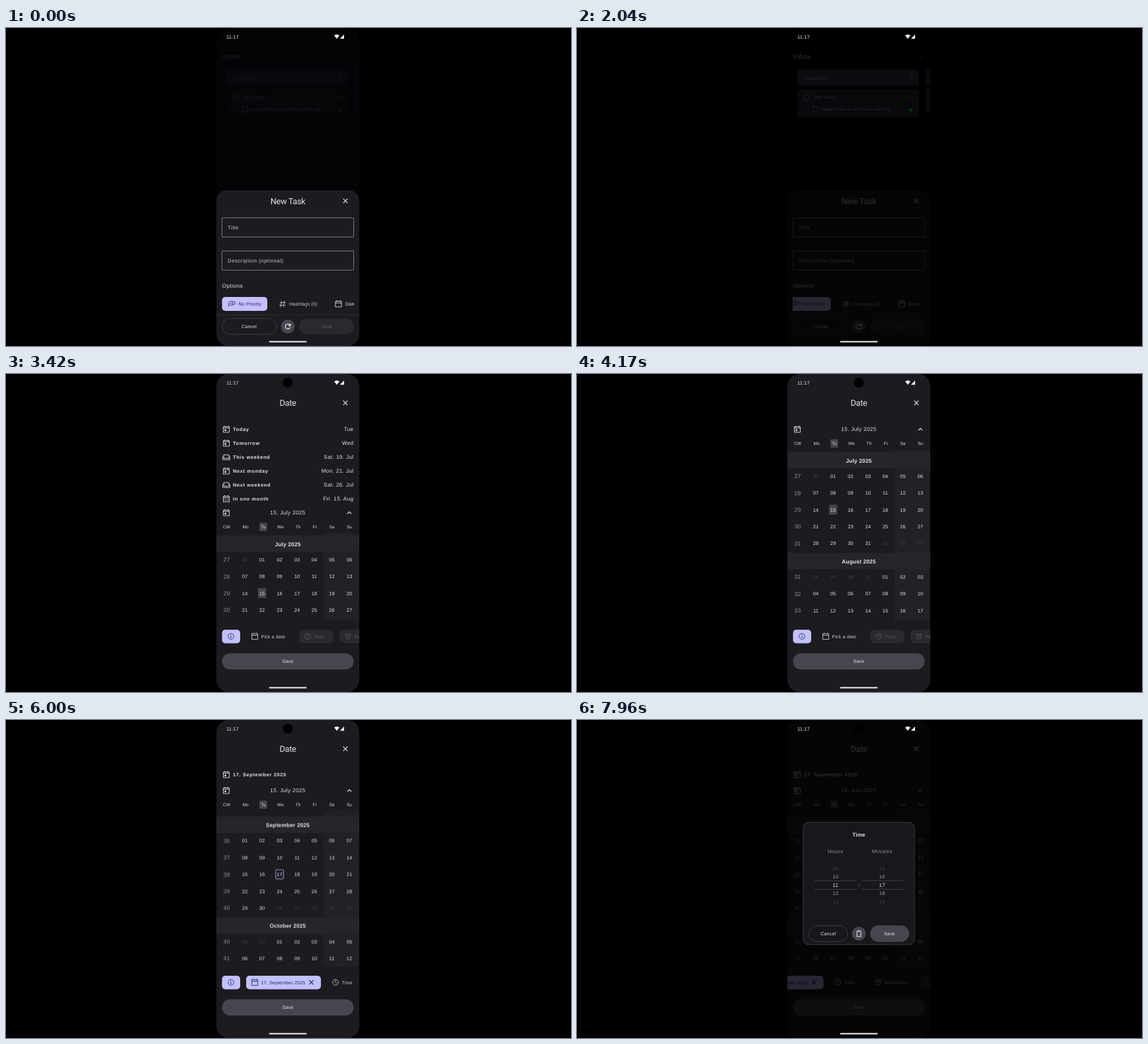
An HTML page for the animation above (8000 ms loop, 854 by 480 pixels).

```html
<!DOCTYPE html>
<html lang="en">
<head>
<meta charset="utf-8">
<title>New task</title>
<style>
  html, body { margin: 0; width: 100%; height: 100%; overflow: hidden; background: #000; }
  svg { display: block; width: 100%; height: 100%; }
  text { font-family: "Liberation Sans", Arial, sans-serif; white-space: pre; }
  .title { font-family: Roboto, sans-serif; }
  use { fill: none; stroke: currentColor; stroke-width: .9; }
  .anim, .drag { animation: 8s linear infinite; }

  #taskChips { animation-name: taskChips; animation-timing-function: ease-in-out; }
  #taskDim { animation-name: taskDim; }
  #inbox { animation-name: inbox; }
  #dateSheet { animation-name: dateSheet; animation-timing-function: ease-out; }
  #outer { animation-name: outer; animation-timing-function: ease-in-out; }
  #months { animation-name: months; animation-timing-function: ease-in-out; }
  .before { animation-name: before; }
  .after { animation-name: after; }
  .drag { animation-name: drag; }
  #touch { animation-name: touch; }
  #timeDim { animation-name: timeDim; }
  #dialog { animation-name: dialog; }

  @keyframes taskChips { 0%, 12.5% { transform: none } 17.5%, 100% { transform: translateX(-11.5px) } }
  @keyframes taskDim { 0%, 23.4% { opacity: 0 } 25.4%, 100% { opacity: .8 } }
  @keyframes inbox { 0%, 23.4% { opacity: .7 } 25.4%, 100% { opacity: 1 } }
  @keyframes dateSheet { 0%, 25.7% { transform: translateY(480px) } 30%, 100% { transform: none } }
  @keyframes outer {
    0%, 43.2% { transform: none }
    51.8%, 53% { transform: translateY(-126px) }
    56%, 71.87% { transform: translateY(-130.5px) }
    71.88%, 100% { transform: translateY(-103px) }
  }
  @keyframes months { 0%, 52.7% { transform: none } 62%, 100% { transform: translateY(-299.5px) } }
  @keyframes before { 0%, 71.87% { opacity: 1 } 71.88%, 100% { opacity: 0 } }
  @keyframes after { 0%, 71.87% { opacity: 0 } 71.88%, 100% { opacity: 1 } }
  @keyframes drag {
    0%, 82.3% { transform: none }
    87.5% { transform: translateX(-95px) }
    89%, 100% { transform: translateX(-103.5px) }
  }
  @keyframes touch { 0%, 82.2% { opacity: 0 } 82.3%, 89% { opacity: 1 } 89.5%, 100% { opacity: 0 } }
  @keyframes timeDim { 0%, 92.8% { opacity: 0 } 96%, 100% { opacity: .8 } }
  @keyframes dialog { 0%, 92.8% { opacity: 0 } 96.5%, 100% { opacity: 1 } }
</style>
</head>
<body>
<svg id="stage" viewBox="0 0 854 480" text-rendering="geometricPrecision">
  <defs>
    <clipPath id="phone"><rect x="318" width="216" height="480" rx="18"/></clipPath>
    <clipPath id="taskRow"><rect x="326.5" y="400" width="199.5" height="32"/></clipPath>
    <clipPath id="scroller"><rect x="318" y="71" width="216" height="300.5"/></clipPath>
    <clipPath id="monthArea"><rect x="318" y="240.5" width="216" height="400"/></clipPath>
    <g id="cal"><path d="M-4.5-4h9v8.5h-9zM-4.5-1.5h9M-2.5-5.5v2M2.5-5.5v2"/></g>
    <g id="day"><path d="M-4.5-4h9v8.5h-9zM-4.5-2h9M-2.5-5.5v2M2.5-5.5v2"/><path d="M-2.7 0h2.6v2.6h-2.6z" fill="currentColor" stroke="none"/></g>
    <g id="grid"><path d="M-4.5-4h9v8.5h-9zM-4.5-2h9M-2.5-5.5v2M2.5-5.5v2"/><path d="M-3 .2h6M-3 2.4h6" stroke-dasharray="1.2"/></g>
    <g id="sofa"><path d="M-4-.5V-3.5h8v3M-5.5-.5h1.8v2.3h7.4V-.5h1.8v4.3h-11z"/></g>
    <g id="close"><path d="M-3.3-3.3 3.3 3.3M3.3-3.3-3.3 3.3" stroke-width="1.2"/></g>
    <g id="up"><path d="M-3 1.5 0-1.5 3 1.5" stroke-width="1.2"/></g>
    <g id="hash"><path d="M-1.2-5-3 5M3-5 1.2 5M-4.5-2h9.5M-5 2h9.5"/></g>
    <g id="info"><circle r="4.3"/><path d="M0-2.4v1M0-.4v2.8" stroke-width="1.1"/></g>
    <g id="clock"><circle r="4.3"/><path d="M0-2.8V.2L2 1.6"/></g>
    <g id="alarm"><circle cy=".4" r="3.6"/><path d="M0-1.6V.6L1.4 1.5M-4.6-2.6l2-2M4.6-2.6l-2-2"/></g>
    <g id="priority"><path d="M-4.5 3.5V-2l2-2h3M-4.5 3.5l2-2H2M1-3.5h4v4H1zM-2.5-1h2"/></g>
    <g id="refresh"><path d="M3.6-1.2A3.8 3.8 0 1 0 3.6 1.3M3.9-4.2v3h-3" stroke-width="1.2"/></g>
    <g id="trash"><path d="M-2.8-2.5v7h5.6v-7M-4-3.5h8M-1.3-4.7h2.6" stroke-width="1.1"/></g>
  </defs>
</svg>
<script>
const INK = '#e5e1e9', SOFT = '#c8c5d0', MUTED = '#918f9a', FAINT = '#5d5c64', DIM = '#414047';
const PAGE = '#040306', SHEET = '#1c1b20', BAND = '#26252a', WEEKEND = '#222126', DISABLED = '#2a292e';
const ACCENT = '#c3c0ff', ON_ACCENT = '#2a2a60', BUTTON = '#47464f', OUTLINE = '#47464f';

const text = (x, y, s, { size = 7.2, fill = INK, anchor = 'start', weight = 400, gap = .1, cls = '' } = {}) =>
  `<text x="${x}" y="${y + size * .36}" font-size="${size}" fill="${fill}" text-anchor="${anchor}"
    font-weight="${weight}" letter-spacing="${gap}" class="${cls}">${s}</text>`;
const mid = (x, y, s, o) => text(x, y, s, { anchor: 'middle', ...o });
const box = (x, y, w, h, fill, rx = 0, stroke = 'none') =>
  `<rect x="${x}" y="${y}" width="${w}" height="${h}" rx="${rx}" fill="${fill}" stroke="${stroke}" stroke-width=".8"/>`;
const icon = (id, x, y, color = INK) => `<use href="#${id}" x="${x}" y="${y}" color="${color}"/>`;
const disc = (x, y, r, fill) => `<circle cx="${x}" cy="${y}" r="${r}" fill="${fill}"/>`;
const line = (x1, x2, y, color) => `<path d="M${x1} ${y}H${x2}" stroke="${color}" stroke-width=".8"/>`;
const anim = (id, body) => `<g id="${id}" class="anim">${body}</g>`;
const clip = (id, body) => `<g clip-path="url(#${id})">${body}</g>`;
const title = (y, s) => mid(426, y, s, { size: 12.8, gap: -.35, cls: 'title' });

function taskSheet() {
  const field = (y, label) => box(326.5, y, 199, 29, 'none', 1.5, MUTED) +
    text(335, y + 14.5, label, { size: 8, gap: .4, fill: SOFT });
  const chips = box(326.5, 406, 68.5, 21, ACCENT, 5) + icon('priority', 341, 416.5, ON_ACCENT) +
    text(351.5, 416.5, 'No Priority', { fill: ON_ACCENT }) +
    icon('hash', 418, 416.5, SOFT) + text(428, 416.5, 'Hashtags (0)', { fill: SOFT }) +
    icon('cal', 502.5, 416.5) + text(513, 416.5, 'Date');
  return box(318, 245, 216, 235, SHEET, 15) + title(261, 'New Task') + icon('close', 513, 261) +
    field(286.5, 'Title') + field(336.5, 'Description (optional)') +
    text(326.5, 389, 'Options', { size: 8.4, gap: .4 }) +
    clip('taskRow', anim('taskChips', chips)) + line(318, 534, 433, '#38373d') +
    box(326.5, 438.5, 82.5, 24, 'none', 12, OUTLINE) + mid(367.5, 450.5, 'Cancel') +
    disc(426, 450.5, 10.5, BUTTON) + icon('refresh', 426, 450.5) +
    box(443, 438.5, 83, 24, DISABLED, 12) + mid(484.5, 450.5, 'Save', { fill: FAINT });
}

function inbox() {
  const ink = '#2a2830', tone = { fill: ink };
  const check = (x, y) => box(x - 4, y - 4, 8, 8, 'none', 2, ink);
  const dots = (x, y, dx, dy) => [-1, 0, 1].map(i => disc(x + i * dx, y + i * dy, .8, ink)).join('');
  return text(326.5, 43.5, 'Inbox', { ...tone, size: 11, cls: 'title' }) + dots(519, 43.5, 0, 3) +
    box(333, 63, 184, 24, '#0c0b0f', 3) + text(341, 75, '(no section)', tone) + dots(506, 75, 0, 2.5) +
    box(333, 93, 184, 42, '#09080b', 3) + check(347, 104.5) + text(356, 104.5, 'Start using', tone) +
    dots(503, 104.5, 3.2, 0) + check(361, 122.5) + text(369, 122.5, 'Swipe down to add more tasks (3)', { ...tone, size: 6.8 }) +
    disc(504, 124, 2.5, '#0c2a0c') + box(527, 63, 7, 24, '#0a090d') + box(527, 91, 7, 37, '#0a090d');
}

const COLS = [361, 387, 413.5, 440, 466, 492.5, 519];
const MONTH_HEIGHT = 152.3, ROW = 25.4, DAY_MS = 864e5;

function month(index) {
  const m = 6 + index, top = 256.5 + index * MONTH_HEIGHT;
  const first = new Date(Date.UTC(2025, m, 1));
  const monday = +first - (first.getUTCDay() + 6) % 7 * DAY_MS;
  const name = ['July', 'August', 'September', 'October'][index];
  let out = box(318, top - 13, 216, 25, BAND) + mid(426, top, name + ' 2025', { size: 8.4, weight: 700, gap: .15 });
  for (let r = 0; r < 5; r++) {
    const y = top + 23.5 + r * ROW, start = monday + r * 7 * DAY_MS;
    const week = 27 + Math.round((start - Date.UTC(2025, 5, 30)) / (7 * DAY_MS));
    out += mid(333.5, y, week, { size: 8.7, fill: MUTED });
    COLS.forEach((x, c) => {
      const d = new Date(start + c * DAY_MS), inside = d.getUTCMonth() === m, n = d.getUTCDate();
      if (inside && m === 6 && n === 15) out += box(x - 6.2, y - 7.5, 12.5, 15, BUTTON, 1.5);
      if (inside && m === 8 && n === 17)
        out += `<g class="anim after">${box(x - 5.7, y - 7, 11.6, 14, 'none', 1, ACCENT)}</g>`;
      out += mid(x, y, String(n).padStart(2, '0'), { size: 7.5, fill: inside ? INK : DIM });
    });
  }
  return out;
}

function calendar() {
  const presets = [
    ['day', 'Today', 'Tue'], ['day', 'Tomorrow', 'Wed'], ['sofa', 'This weekend', 'Sat. 19. Jul'],
    ['day', 'Next monday', 'Mon. 21. Jul'], ['sofa', 'Next weekend', 'Sat. 26. Jul'], ['grid', 'In one month', 'Fri. 15. Aug'],
  ].map(([id, label, when], i) => {
    const y = 83.5 + i * 21;
    return icon(id, 333, y) + text(343, y, label, { size: 7.4, weight: 700, gap: .65 }) +
      text(525.5, y, when, { size: 8.2, gap: .35, anchor: 'end' });
  }).join('');
  const names = ['CW', 'Mo', 'Tu', 'We', 'Th', 'Fr', 'Sa', 'Su'];
  const xs = [333.5, 362, 389, 415, 441.5, 467, 492.5, 519];
  const head = icon('day', 333, 209.5) + mid(426, 209.5, '15. July 2025', { size: 8.2, gap: .35 }) +
    icon('up', 519, 209.5) + box(383, 224.5, 11.5, 12.5, BUTTON, 1.5) +
    names.map((n, i) => mid(xs[i], 230.5, n, { size: 6.5 })).join('');
  const weekend = box(479.5, 240, 54.5, 400, WEEKEND);
  const months = [0, 1, 2, 3].map(month).join('');
  return clip('scroller',
    anim('outer', `<g class="anim before">${presets}</g>` + head +
      clip('monthArea', weekend + anim('months', months))) +
    `<g class="anim after">${icon('day', 333, 82.5)}${text(343, 82.5, '17. September 2025', { size: 7.4, weight: 700, gap: .65 })}</g>`);
}

function chip(x, id, label, width, enabled) {
  const tone = enabled ? SOFT : FAINT;
  return (enabled ? '' : box(x, 386, width, 20.5, DISABLED, 7)) +
    icon(id, x + 13, 396, tone) + text(x + 22.5, 396, label, { fill: tone });
}

function dateSheet() {
  const info = box(326.5, 386, 27.5, 20.5, ACCENT, 5) + icon('info', 340, 396, ON_ACCENT);
  const plain = info + chip(363, 'cal', 'Pick a date', 71, true) +
    chip(443, 'clock', 'Time', 52, false) + chip(504, 'alarm', 'Notification', 68, false);
  const picked = info + box(363, 386, 113, 20.5, ACCENT, 5) + icon('cal', 376, 396, ON_ACCENT) +
    text(385.5, 396, '17. September 2025', { fill: ON_ACCENT }) + icon('close', 461.5, 396, ON_ACCENT) +
    chip(485, 'clock', 'Time', 52, true) + chip(546, 'alarm', 'Notification', 68, true) +
    chip(623, 'refresh', 'Repeat', 58, false);
  return box(318, 0, 216, 480, SHEET, 18) + disc(426, 13, 7.5, '#000') + title(43.5, 'Date') +
    icon('close', 513, 43.5) + calendar() +
    `<g class="anim before">${plain}</g><g class="anim after"><g class="drag">${picked}</g></g>` +
    box(326.5, 421.5, 199, 24.5, BUTTON, 12.2) + mid(426, 433.7, 'Save') +
    anim('touch', `<g class="drag">${disc(480.5, 401.5, 4.8, '#77767c')}</g>`);
}

function dialog() {
  const wheel = (x, label, middle) => mid(x, 198.5, label, { size: 8, gap: .45, fill: MUTED }) +
    [-2, -1, 0, 1, 2].map(i => mid(x, 249 + i * 12.4, String(middle + i).padStart(2, '0'),
      { size: i ? 7.6 : 8, gap: .3, fill: [INK, '#a3a1a9', DIM][Math.abs(i)] })).join('') +
    line(x - 32, x + 32, 242.7, OUTLINE) + line(x - 32, x + 32, 255.5, OUTLINE);
  return box(342, 154.5, 168, 184.5, '#18171b', 8, OUTLINE) +
    mid(426, 173, 'Time', { size: 8.2, weight: 700 }) +
    wheel(390.7, 'Hours', 11) + wheel(461.3, 'Minutes', 17) + mid(426, 249, ':', { size: 8.5 }) +
    box(350.5, 310.5, 58.5, 24, 'none', 12, OUTLINE) + mid(379.7, 322.5, 'Cancel') +
    disc(426, 322.5, 10.5, BUTTON) + icon('trash', 426, 322.5) +
    box(443, 310, 59, 25, BUTTON, 12.5) + mid(472.3, 322.5, 'Save');
}

const shade = id => anim(id, box(318, 0, 216, 480, '#000', 18));
const system = text(333, 13.3, '11:17', { size: 7.5 }) +
  `<path d="M496 11.2q4-3 8 0l-4 5zM504.8 16.2h6.2v-6.4z" fill="#f4f1f6"/>` +
  box(397.5, 472.6, 57, 2, '#f4f1f6', 1);

document.getElementById('stage').insertAdjacentHTML('beforeend', clip('phone',
  box(318, 0, 216, 480, PAGE) + taskSheet() + shade('taskDim') + anim('inbox', inbox()) +
  anim('dateSheet', dateSheet()) + shade('timeDim') + anim('dialog', dialog()) + system));
</script>
</body>
</html>
```
